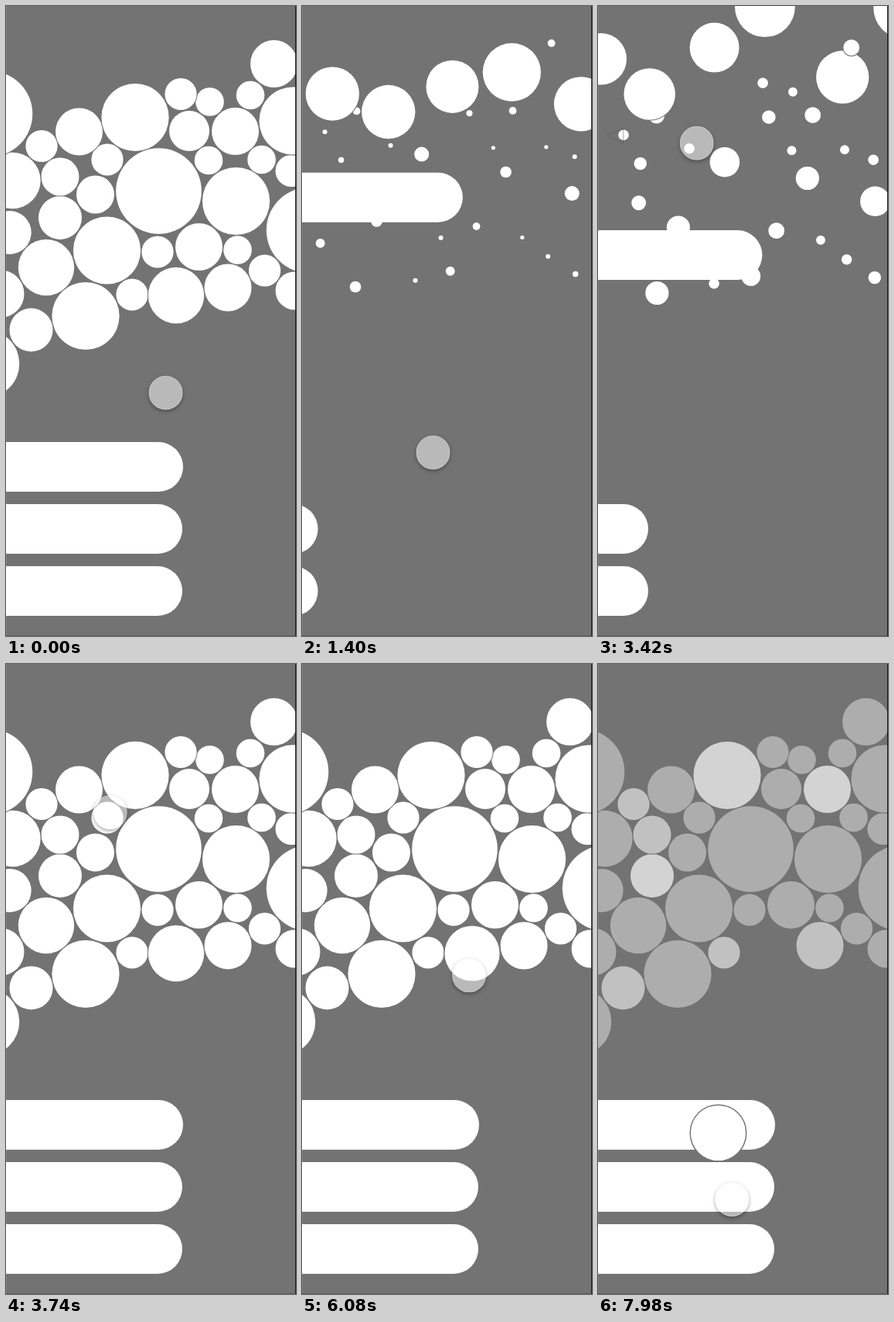
Write an HTML page with a canvas that moves like this. It is 375 px wide and 812 px high and loops after 8 s.

```html
<!DOCTYPE html>
<html lang="en">
<head>
<meta charset="utf-8">
<title>Bubbles</title>
<style>
  html, body { margin: 0; width: 100%; height: 100%; overflow: hidden; background: #737373; }
  canvas { display: block; }
  #cursor {
    position: absolute; left: -22px; top: -22px; width: 44px; height: 44px;
    box-sizing: border-box; border-radius: 50%;
    background: rgba(255, 255, 255, .5); border: 1px solid rgba(255, 255, 255, .2);
    box-shadow: 0 2px 5px rgba(0, 0, 0, .35);
  }
</style>
</head>
<body>
<canvas id="stage" width="375" height="812"></canvas>
<div id="cursor"></div>
<script>
const LOOP = 8000, BG = '#737373', DIM = .415;
const OPEN = 1180, CLOSE = 3299.3, MORPH = 450, GRAB = 6000;
const ROW = { x: 47.3, y: 72, step: 82.65, r: 36.2 };
const ctx = document.getElementById('stage').getContext('2d');
const cursor = document.getElementById('cursor');

// Bubble centres by radius. Tags: r joins the row, w and h light up, f in front, d is dragged
const sizes = {
  18.3: [[263.5, 123.5], [262, 199], [316, 115], [330.5, 198], [299.5, 314.5]],
  20.6: [[46, 180.5, 'w'], [131, 198], [163, 372, 'w'], [196, 317], [226, 113.5], [334.5, 341], [369, 212.5]],
  24.5: [[70, 220, 'w'], [115.5, 243, 'r'], [373, 367]],
  26: [[237, 161]],
  28: [[70, 273, 'h'], [4.7, 292, 'r'], [32.5, 417.5, 'rw']],
  30.5: [[94.5, 162], [-7, 371], [296.5, 161.5, 'h'], [249.5, 310.5], [287, 363, 'rw'], [346.5, 74.5, 'f']],
  36.2: [[8.5, 225], [52, 337], [220, 373, 'd']],
  43.6: [[-26.3, 461], [130.5, 315], [103, 399.5], [297.5, 251.5], [167, 143.5, 'rh'], [371, 148, 'r']],
  55.3: [[-21, 139], [197.5, 238.5], [392, 289]]
};
const bubbles = Object.entries(sizes).flatMap(([r, list]) =>
  list.map(([x, y, tags = '']) => ({ x, y, r: +r, has: tag => tags.includes(tag) })));
const members = bubbles.filter(b => b.has('r')).sort((a, b) => a.x - b.x);
const front = bubbles.filter(b => b.has('f'));
const held = bubbles.find(b => b.has('d'));
const dots = bubbles.filter(b => !b.has('r') && !b.has('f') && b !== held);

// Key points: arrive, leave, x, y
const cursorPath = [
  [0, 20, 206.5, 498.5], [820, 1450, 169.5, 575.5], [1900, 1900, 136.5, 312.5],
  [2220, 2480, 130.5, 188], [2580, 3650, 127.7, 176.7], [4090, 4090, 217, 353],
  [4300, 4300, 244, 385], [4820, 4980, 226.5, 419.5], [5700, 5960, 217, 387],
  [6600, 6760, 207, 542], [6920, 6920, 199.5, 550.5], [7500, 7740, 188.5, 586],
  [8000, 8000, 173, 692]
];
const dragPath = [
  [0, 6890, held.x, held.y], [7500, 7740, 158.5, 575], [8000, 8000, 155.4, 605]
];

const clamp = v => Math.min(1, Math.max(0, v));
const mix = (a, b, u) => a + (b - a) * u;
const progress = (t, start, span) => clamp((t - start) / span);

// Cubic Bezier easing (.4, 0, .1, 1)
function ease(x) {
  let lo = 0, hi = 1;
  for (let i = 0; i < 24; i++) {
    const s = (lo + hi) / 2, r = 1 - s;
    if (1.2 * r * r * s + .3 * r * s * s + s * s * s < x) lo = s; else hi = s;
  }
  return 3 * (1 - lo) * lo * lo + lo ** 3;
}

// Smooth path through key points, resting between arrive and leave
function follow(path, t) {
  const i = Math.max(0, Math.min(path.findLastIndex(p => p[0] <= t), path.length - 2));
  const slope = (k, d) => {
    const a = path[k - 1], p = path[k], b = path[k + 1];
    return a && b && p[0] === p[1] ? (b[d] - a[d]) / (b[0] - a[1]) : 0;
  };
  const p = path[i], q = path[i + 1], span = q[0] - p[1];
  const u = progress(t, p[1], span), u2 = u * u, u3 = u2 * u;
  return [2, 3].map(d =>
    mix(p[d], q[d], 3 * u2 - 2 * u3) +
    span * ((u3 - 2 * u2 + u) * slope(i, d) + (u3 - u2) * slope(i + 1, d)));
}

function disc(x, y, r, color) {
  ctx.fillStyle = color;
  ctx.beginPath();
  ctx.arc(x, y, r, 0, 7);
  ctx.fill();
}

// White disc inside a border of constant width
function bubble(x, y, r, alpha) {
  if (r <= 0) return;
  disc(x, y, r + 1, BG);
  disc(x, y, r, `rgba(255,255,255,${alpha})`);
}

function bar(right, y) {
  ctx.fillStyle = '#fff';
  ctx.beginPath();
  ctx.roundRect(right - 400, y, 400, 64, 32);
  ctx.fill();
}

function edge(color, ...box) {
  ctx.fillStyle = color;
  ctx.fillRect(...box);
}

function backArrow(alpha) {
  ctx.strokeStyle = `rgba(85,85,85,${alpha})`;
  ctx.lineWidth = 1;
  ctx.beginPath();
  ctx.moveTo(32.5, 157);
  ctx.lineTo(12, 167);
  ctx.lineTo(32.5, 177);
  ctx.closePath();
  ctx.stroke();
}

function draw(t) {
  const closing = t >= CLOSE;
  // u: 1 = packed bubbles, 0 = row
  const u = closing ? ease(progress(t, CLOSE, MORPH)) : 1 - ease(progress(t, OPEN, MORPH));
  const dim = progress(t, GRAB + 100, 300), lit = progress(t, 7890, 90);
  const alphaOf = b => mix(mix(1, DIM, dim), b.has('h') ? .69 : b.has('w') ? .56 : DIM, lit);

  edge(BG, 0, 0, 375, 812);
  edge('#808080', 0, 0, 1, 812);

  // Shrinks towards its top left corner
  const dot = b => {
    const k = (b.r + 1) * (1 - u);
    bubble(b.x - .935 * k, b.y - 1.035 * k, (b.r + 1) * u - 1, alphaOf(b));
  };
  dots.forEach(dot);
  if (t < GRAB) dot(held);

  members.forEach((b, i) => {
    const rowX = ROW.x + ROW.step * i;
    // On the way back the row swings up and left, larger bubbles further
    const swing = closing ? (1 - u) * Math.min(1, 10 * u) : 0, extra = b.r - 28;
    bubble(
      mix(rowX, b.x, u) - swing * (44 + .5 * extra),
      mix(ROW.y, b.y, u) - swing * (130 + 1.35 * extra),
      mix(ROW.r, b.r, u), alphaOf(b));
  });
  front.forEach(dot);

  if (closing && u < 1) backArrow(.7 * (1 - u));

  bar(mix(203, 229, u), mix(135, 562, u));
  for (const y of [642, 722]) bar(mix(-27, 228, u), y);

  if (t >= GRAB) {
    const [x, y] = follow(dragPath, t);
    disc(x, y, 37, BG);
    disc(x, y, 35.6, '#fff');
  }

  edge('#606060', 0, 811, 375, 1);
  edge('#151515', 374, 0, 1, 812);

  const [cx, cy] = follow(cursorPath, t);
  cursor.style.transform = `translate(${cx}px, ${cy}px)`;
}

let start;
function tick(now) {
  start ??= now;
  draw((now - start) % LOOP);
  requestAnimationFrame(tick);
}
draw(0);
requestAnimationFrame(tick);
</script>
</body>
</html>
```
